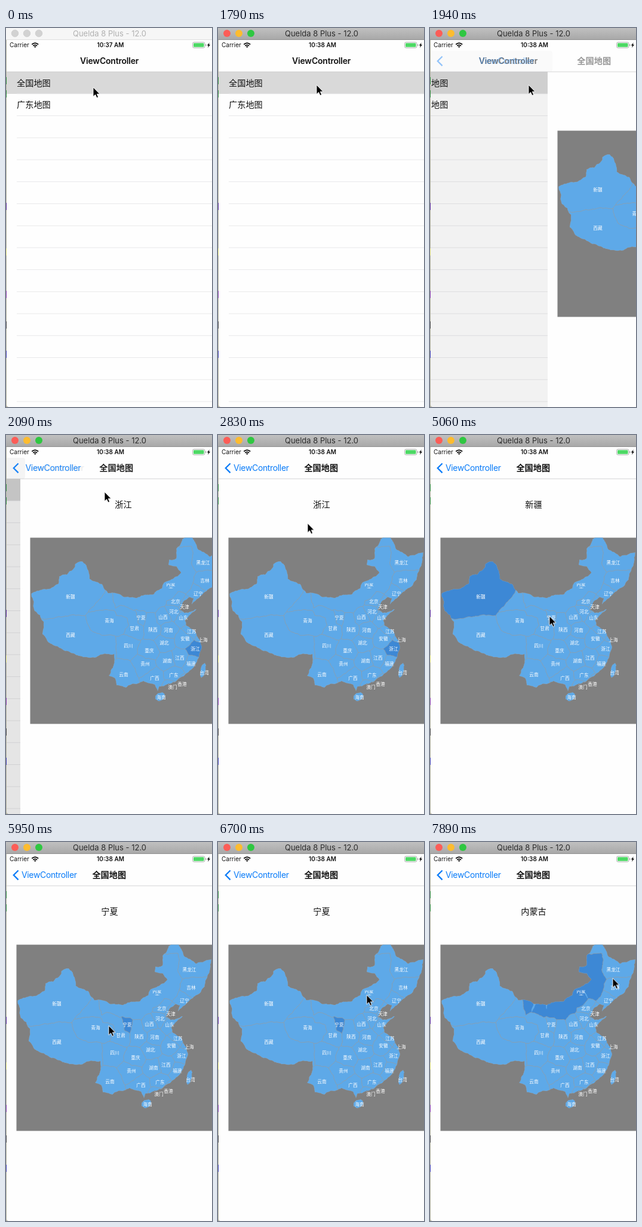
Recreate the animation shown at these times as an HTML page. Size 345 by 633 pixels, loop 8000 ms.

```html
<!DOCTYPE html>
<html lang="zh-CN">
<head>
<meta charset="utf-8">
<title>ViewController</title>
<style>
html, body { margin: 0; width: 100%; height: 100%; overflow: hidden; background: #fefefe; }
svg { display: block; width: 100vw; height: 100vh; }
text { font-family: Inter, "Noto Sans CJK SC", "Noto Sans CJK", sans-serif; font-size: 14.2px; fill: #111; }
.mid { text-anchor: middle; }
.bold { font-weight: 600; }
.nav { font-size: 14px; letter-spacing: -.35px; }
.nav.bold { letter-spacing: -.2px; }
.blue { fill: #0a7cf8; }
.small { font-size: 10px; }
.bar { font-size: 13px; }
.tag { font-size: 7.7px; fill: #fff; text-anchor: middle; }
.land { fill: #5ea9e8; }
.line { fill: none; stroke: #9a9c9e; stroke-width: .7; stroke-linejoin: round; }
.pick { fill: #3d88d5; }

/* everything runs on one 8 s clock with hard steps */
svg, .cursor, .idle, .before, .after, .s1, .s2, .s3, .s4 { animation: push 8s step-end infinite; }
.cursor { animation-name: move; }
.idle { animation-name: idle; }
.before { animation-name: before; }
.after { animation-name: after; }
.s1 { animation-name: s1; }
.s2 { animation-name: s2; }
.s3 { animation-name: s3; }
.s4 { animation-name: s4; }

.page { transform: translateX(calc(var(--off) * 1px)); }
.list { transform: translateX(calc((var(--off) - 344) * .3px)); }
.dim { opacity: calc((1 - var(--off) / 344) * .107); }
.veil { transform: translateX(calc(var(--off) * 1px - 344px)); opacity: calc(min(1, var(--off) / 20) * (1 - var(--off) / 344)); }
.head { transform: translateX(calc(var(--off) * .52px)); }
.back { transform: translateX(calc(var(--off) * .285px)); }
.in { opacity: calc(1 - var(--off) / 344); }
.out { opacity: calc(var(--off) / 344); }

@keyframes push {
  0% { --off: 344; } 24.25% { --off: 196; } 26.125% { --off: 23; }
  28% { --off: 3; } 29.875%, 100% { --off: 0; }
}
@keyframes move {
  0% { transform: translate(146px, 99px); }
  11.25% { transform: translate(146px, 99px); animation-timing-function: steps(2, start); }
  15% { transform: translate(165px, 95px); }
  35.375% { transform: translate(150px, 147.5px); }
  37.25% { transform: translate(126px, 183px); }
  40.875% { transform: translate(126px, 183px); animation-timing-function: steps(3, start); }
  46.5% { transform: translate(92px, 257px); }
  54% { transform: translate(92px, 257px); animation-timing-function: steps(6, start); }
  65.1% { transform: translate(200px, 302.5px); }
  74.375% { transform: translate(200px, 302.5px); animation-timing-function: steps(2, start); }
  78.125% { transform: translate(144px, 311px); animation-timing-function: steps(4, start); }
  85.625% { transform: translate(249px, 255.5px); }
  95% { transform: translate(249px, 255.5px); animation-timing-function: steps(3, start); }
  100% { transform: translate(306px, 227.5px); }
}
@keyframes idle { 0% { opacity: 1; } 22.375%, 100% { opacity: 0; } }
@keyframes before { 0% { opacity: 1; } 11.25%, 100% { opacity: 0; } }
@keyframes after { 0% { opacity: 0; } 11.25%, 100% { opacity: 1; } }
@keyframes s1 { 0% { opacity: 1; } 48.375%, 100% { opacity: 0; } }
@keyframes s2 { 0% { opacity: 0; } 48.375% { opacity: 1; } 67%, 100% { opacity: 0; } }
@keyframes s3 { 0% { opacity: 0; } 67% { opacity: 1; } 89.375%, 100% { opacity: 0; } }
@keyframes s4 { 0% { opacity: 0; } 89.375%, 100% { opacity: 1; } }
</style>
</head>
<body>
<svg viewBox="0 0 345 633" preserveAspectRatio="none">
  <defs>
    <linearGradient id="metal" x2="0" y2="1">
      <stop stop-color="#c0c0c0"/><stop offset="1" stop-color="#a7a7a7"/>
    </linearGradient>
    <clipPath id="frame"><rect x="17.500" y="171.500" width="330" height="311"/></clipPath>
    <clipPath id="slot"><rect x="243" y="247.500" width="20" height="9"/></clipPath>
    <clipPath id="phone"><path d="M1 0H345V633H5Q1 633 1 629Z"/></clipPath>
    <clipPath id="coast"></clipPath>
  </defs>

  <rect width="345" height="633" fill="#b3b2a0"/>
  <g id="desk"></g>

  <g clip-path="url(#phone)">
    <rect width="345" height="633" fill="#fefefe"/>
    <g class="list">
      <rect y="73" width="345" height="37" fill="#d9d9d9"/>
      <g id="rows" fill="#e6e6e8"></g>
      <text x="18" y="96.700">全国地图</text>
      <text x="18" y="133.400">广东地图</text>
    </g>
    <rect class="dim" y="73" width="345" height="560"/>

    <g class="page">
      <rect x="1" y="73" width="345" height="560" fill="#fefefe"/>
      <g id="titles"></g>
      <rect x="17.500" y="171.500" width="330" height="311" fill="#808080"/>
      <g clip-path="url(#frame)">
        <g id="map" clip-path="url(#coast)"></g>
        <g id="tags"></g>
        <g clip-path="url(#slot)">
          <text class="tag" x="253" y="251.500">内蒙</text>
          <text class="tag" x="253" y="260.500">古</text>
        </g>
      </g>
    </g>

    <rect y="20" width="345" height="53" fill="#fefefe"/>
    <rect class="veil" x="-4" y="38" width="357" height="35" rx="4" fill="#f4f4f4"/>
    <rect y="72.700" width="345" height=".8" fill="#c9c9cb"/>

    <text class="small" x="6" y="32.300">Carrier</text>
    <path d="M43.300 27.500Q48.700 22.800 54.100 27.500M45.300 29.800Q48.700 26.900 52.100 29.800" fill="none" stroke="#000" stroke-width="1.700"/>
    <path d="M46.900 31L48.700 33 50.500 31Q48.700 29.700 46.900 31Z"/>
    <text class="small bold mid before" x="175" y="32.300">10:37 AM</text>
    <text class="small bold mid after" x="175" y="32.300">10:38 AM</text>
    <rect x="312.500" y="23.800" width="20.500" height="9.400" rx="2.500" fill="none" stroke="#9b9b9b" stroke-width=".8"/>
    <rect x="314" y="25.300" width="17.500" height="6.400" rx="1.300" fill="#4cd964"/>
    <path d="M334.200 27v3q1.400-.4 1.400-1.500t-1.400-1.500" fill="#9b9b9b"/>
    <path d="M340.800 24.200L336.800 29.200H339L338 33 342 27.800H339.700Z"/>

    <path class="in" d="M20.600 47.500L12.800 55.300 20.600 63.100" fill="none" stroke="#0a7cf8" stroke-width="2.300"/>
    <g class="back">
      <text class="nav bold out" x="26" y="60.300">ViewController</text>
      <text class="nav blue in" x="26" y="60.300">ViewController</text>
    </g>
    <g class="head"><text class="bold mid in" x="172.800" y="59.800">全国地图</text></g>
  </g>

  <rect width="345" height="20" fill="url(#metal)"/>
  <rect y="19.200" width="345" height=".8" fill="#8e8e8e"/>
  <circle cx="15" cy="9" r="6" fill="#fc5d57"/>
  <circle cx="35" cy="9" r="6" fill="#fdbc2f"/>
  <circle cx="55" cy="9" r="6" fill="#2fc741"/>
  <text class="bar mid" x="173.500" y="13.800" style="fill:#2c2c2c">Quelda 8 Plus - 12.0</text>
  <g class="idle">
    <rect width="345" height="20" fill="#f6f6f6"/>
    <rect y="19.300" width="345" height=".7" fill="#d6d6d6"/>
    <g fill="#d2d2d2" stroke="#c4c4c4" stroke-width=".6">
      <circle cx="15" cy="9" r="5.800"/><circle cx="35" cy="9" r="5.800"/><circle cx="55" cy="9" r="5.800"/>
    </g>
    <text class="bar mid" x="173.500" y="13.800" style="fill:#b1b1b1">Quelda 8 Plus - 12.0</text>
  </g>

  <path class="cursor" d="M0 0V15.600L3.600 12.300 6 17.600 8.600 16.500 6.300 11.300H11Z" stroke="#fff" stroke-width=".9"/>
</svg>

<script>
const $ = id => document.getElementById(id);

function add(parent, name, attrs, text = '') {
  const el = document.createElementNS('http://www.w3.org/2000/svg', name);
  for (const k in attrs) el.setAttribute(k, attrs[k]);
  el.textContent = text;
  return $(parent).appendChild(el);
}

// Table separators, and slivers of the window behind
for (let i = 1; i < 16; i++)
  add('rows', 'rect', { x: 18, y: 72.7 + 36.72 * i, width: 345, height: .9 });
const inks = ['#2f8a3c', '#2f8a3c', '#5a2a9c', '#dede7c', '#8a3cb0', '#444', '#4040b8'];
[82, 104, 292, 368, 439, 490, 539].forEach((y, i) =>
  add('desk', 'rect', { x: 0, y, width: 1, height: 12, fill: inks[i] }));

// Fractal edges: the jitter depends only on the midpoint, so shared borders agree
const noise = (x, y) => {
  const s = Math.sin(x * 12.9898 + y * 78.233) * 43758.5453;
  return s - Math.floor(s) - .5;
};
function split(a, b, amp) {
  const len = Math.hypot(a[0] - b[0], a[1] - b[1]);
  if (len < 3) return [b];
  const x = (a[0] + b[0]) / 2, y = (a[1] + b[1]) / 2;
  const m = [x + noise(x, y) * len * amp, y + noise(y, x) * len * amp];
  return [...split(a, m, amp), ...split(m, b, amp)];
}
const path = pts => 'M' + pts.map(p => `${p[0].toFixed(1)} ${p[1].toFixed(1)}`).join('L');
const edge = (a, b, amp = .2) => [a, ...split(a, b, amp)];
const next = (pts, i) => pts[(i + 1) % pts.length];
const closed = (pts, amp) => path(pts.flatMap((p, i) => edge(p, next(pts, i), amp))) + 'Z';
const pairs = n => n.flatMap((v, i) => i % 2 ? [] : [[+v, +n[i + 1]]]);
const ring = (cx, cy, rx, ry, tilt) => [...Array(8).keys()].map(i => {
  const u = rx * Math.cos(i * Math.PI / 4), v = ry * Math.sin(i * Math.PI / 4);
  return [cx + u * Math.cos(tilt) - v * Math.sin(tilt), cy + u * Math.sin(tilt) + v * Math.cos(tilt)];
});

// Key points of the coast and land frontier
const mainland = pairs(`19 265 48 257 65 248 66 236 79 233 91 222 93 215 105 211 113 222 117 240
  138 249 148 264 165 265 196 272 225 265 238 256 242 246 270 230 263 220 249 217 250 208 262 206
  262 190 272 174 287 169 298 190 318 203 344 196 341 216 334 232 333 241 308 264 288 283 291 273
  284 271 268 292 276 297 296 291 277 310 279 318 293 326 303 344 305 355 300 372 292 388 268 406
  234 420 231 428 226 417 207 411 188 416 178 422 162 418 159 406 149 402 157 385 158 366 135 367
  120 372 100 369 58 352 38 333 40 312 24 292`.split(/\s+/));
const land = closed(mainland, .22)
  + closed(ring(235, 437, 9, 7, -.5), .2)
  + closed(ring(307, 393, 13, 4.5, 1.8), .2);

// Each province: its name, the label spot, and further seeds where it is long
const regions = `新疆 85 270 118 258|西藏 85 334 140 354|青海 150 310 172 312|宁夏 203 305
甘肃 192 323 148 277 176 297 190 308|陕西 223 325 217 308|山西 240 304|河北 258 295|北京 261 278
天津 276 287|山东 274 305|河南 249 326|江苏 288 328|安徽 277 340|上海 307 342|浙江 294 357
四川 182 352|重庆 217 360|湖北 242 347|湖南 247 377|江西 268 372|福建 287 382|贵州 210 382
云南 174 400|广西 226 406|广东 258 401|台湾 309 397|香港 272 416|澳门 256 421|海南 237 438
黑龙江 307 213 302 190 278 176|吉林 310 243|辽宁 299 265
内蒙古 248 262 163 272 183 280 207 281 218 286 232 272 270 246 276 232 270 213 275 192`
  .split(/[|\n]/).map(row => {
    const [name, ...n] = row.trim().split(' ');
    return { name, seeds: pairs(n) };
  });
const seeds = regions.flatMap(r => r.seeds.map(([x, y]) => ({ x, y, name: r.name })));

// Voronoi cell; each vertex carries the name across the edge that starts there
function cell(s) {
  let pts = [[0, 150], [360, 150], [360, 500], [0, 500]].map(p => [...p, s.name]);
  for (const t of seeds) {
    if (t.x === s.x && t.y === s.y) continue;
    const side = p => (p[0] - (s.x + t.x) / 2) * (t.x - s.x) + (p[1] - (s.y + t.y) / 2) * (t.y - s.y);
    pts = pts.flatMap((a, i) => {
      const b = next(pts, i), fa = side(a), fb = side(b), k = fa / (fa - fb);
      const kept = fa <= 0 ? [a] : [];
      if ((fa <= 0) !== (fb <= 0))
        kept.push([a[0] + (b[0] - a[0]) * k, a[1] + (b[1] - a[1]) * k, fa <= 0 ? t.name : a[2]]);
      return kept;
    });
  }
  return pts;
}

add('coast', 'path', { d: land });
add('map', 'path', { d: land, class: 'land' });

const cells = seeds.map(s => ({ name: s.name, pts: cell(s) }));
['浙江', '新疆', '宁夏', '内蒙古'].forEach((name, i) => {
  const d = cells.filter(c => c.name === name).map(c => closed(c.pts)).join('');
  add('map', 'path', { d, class: `pick s${i + 1}` });
  add('titles', 'text', { x: 173.5, y: 120.8, class: `mid s${i + 1}` }, name);
});

const borders = cells.flatMap(({ name, pts }) =>
  pts.flatMap((p, i) => name < p[2] ? [path(edge(p, next(pts, i)))] : []));
add('map', 'path', { d: borders.join('') + land, class: 'line' });

for (const { name, seeds: [[x, y]] } of regions)
  if (name !== '内蒙古') add('tags', 'text', { x, y: y + 2.9, class: 'tag' }, name);
</script>
</body>
</html>
```
